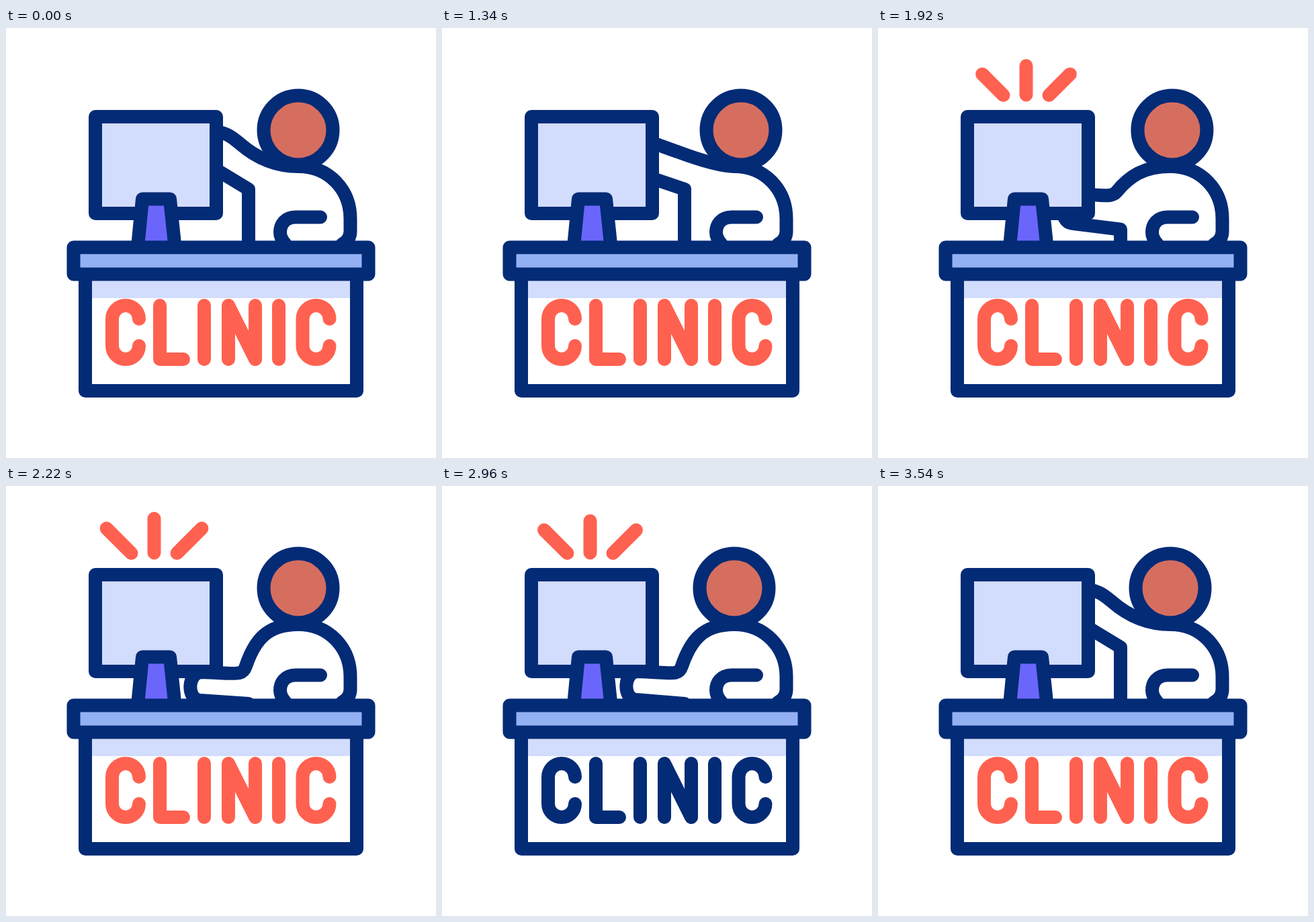
Write an HTML page that moves like this. It is 640 px wide and 640 px high and loops after 3.6 s.

```html
<!DOCTYPE html>
<html lang="en">
<head>
<meta charset="utf-8">
<title>Clinic reception</title>
<style>
  html, body { margin: 0; width: 100%; height: 100%; overflow: hidden; background: #fff; }
  svg { display: block; width: 100%; height: 100%; }
</style>
</head>
<body>
<svg viewBox="0 0 640 640" fill="none" stroke="#042b76" stroke-width="20" stroke-linecap="round" stroke-linejoin="round">
  <path id="rays" stroke="#ff6150"/>
  <path id="arm"/>
  <path d="M435 206C480 206 512.5 240 512.5 284V303Q512 316 500 322"/>
  <path d="M468 281.5H431C415 281.5 408 293 408 304Q408 313 416 322"/>
  <circle id="head" cx="435" cy="152" r="51.5" fill="#d56e5f"/>
  <rect x="133" y="132" width="180" height="144" fill="#d2dcfc"/>
  <path d="M196 326L203 254.5H244L251.5 326" fill="#6b66fb"/>
  <rect x="118" y="366" width="404" height="174" fill="#fff"/>
  <path d="M128 377H512V402H128Z" fill="#d2dcfc" stroke="none"/>
  <rect x="100.5" y="326.5" width="439" height="40" fill="#93b0f3"/>
  <g id="sign">
    <path id="c" d="M198 433A20 20 0 0 0 158 433V473A20 20 0 0 0 198 473"/>
    <path d="M229 413V493H264M295 413V493M331 493V413L371 493V413M406 413V493"/>
    <use href="#c" x="283.5"/>
  </g>
</svg>
<script>
const LOOP = 3600;
const el = id => document.getElementById(id);
const [rays, arm, head, sign] = ['rays', 'arm', 'head', 'sign'].map(el);

// Arm poses: shoulder handles, wrist, wrist handles, hand top, hand bottom, elbow
const RAISED  = [400,206, 372,193, 348,172, 335,161, 328,155, 300,152, 290,197, 361,240];
const REACHED = [415,206, 385,197, 350,184, 335,179, 310,169, 290,163, 290,216, 361,240];
const TYPING  = [388,206, 370,230, 357,268, 352,283, 345,278, 290,276, 288,318, 361,324];

const ease = (t, from, to) => {
  const u = Math.min(1, Math.max(0, (t - from) / (to - from)));
  return u * u * (3 - 2 * u);
};
const mix = (a, b, u) => a + (b - a) * u;
const blend = (p, q, u) => p.map((v, i) => mix(v, q[i], u));

function drawArm(t, pulse) {
  const reach = ease(t, 0, 560), lower = ease(t, 1450, 2180), lift = ease(t, 3240, 3520);
  let pose = blend(RAISED, REACHED, reach);
  pose = blend(pose, TYPING, lower);
  pose = blend(pose, RAISED, lift);
  const [a, b, c, d, e, f, g, h, i, j, hx, hy, lx, ly, ex, ey] = pose;
  const dip = 3 * (1 - pulse) * lower * (1 - lift);
  arm.setAttribute('d', `M435 206C${a} ${b} ${c} ${d} ${e} ${f}` +
    `C${g} ${h} ${i} ${j + dip} ${hx} ${hy + dip}` +
    `C${hx - 20} ${hy + 2 + dip} ${lx - 19} ${ly - 2 + dip} ${lx} ${ly + dip}L${ex} ${ey}V330`);
  head.setAttribute('cx', 435 + 10 * reach * (1 - lower));
}

function drawRays(t, pulse) {
  const size = 58 * ease(t, 1700, 2030) * (1 - ease(t, 3270, 3520)) - 10.5 * pulse;
  const side = size * 0.725;
  rays.setAttribute('d', size > 0
    ? `M220.5 99.5v${-size}M186.5 100l${-side} ${-side}M254.5 100l${side} ${-side}` : '');
}

function drawSign(t) {
  const u = ease(t, 2340, 2580) - ease(t, 3000, 3240);
  const rgb = blend([255, 97, 80], [4, 43, 118], u).map(Math.round);
  sign.setAttribute('stroke', `rgb(${rgb})`);
}

function draw(now) {
  const t = now % LOOP;
  const pulse = t > 2030 && t < 3270 ? (1 - Math.cos((t - 2030) / 620 * 2 * Math.PI)) / 2 : 0;
  drawArm(t, pulse);
  drawRays(t, pulse);
  drawSign(t);
}

const start = performance.now();
function tick() {
  draw(performance.now() - start);
  requestAnimationFrame(tick);
}
tick();
</script>
</body>
</html>
```
